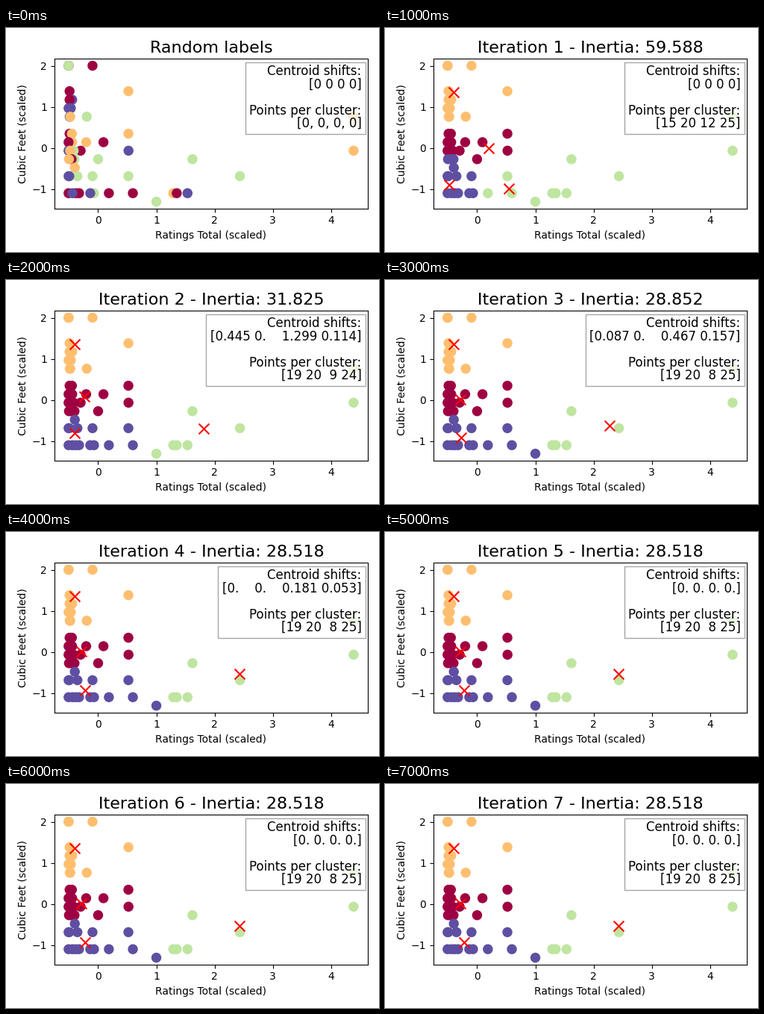
Animation, 500 px wide and 300 px high, one loop 8000 ms. Source, as a matplotlib script:

```python
import numpy as np
import matplotlib.pyplot as plt
from matplotlib.animation import FuncAnimation
from matplotlib.path import Path

plt.rcParams["font.family"] = "DejaVu Sans"

TOP, STEP = 2.0, 0.2066

# (level below the top, x positions, random start labels) in drawing order
ROWS = [
    (0, [-.507, -.507, -.096], "020"),
    (3, [-.49, .52], "01"),
    (4, [-.445, -.49], "30"),
    (5, [-.507, -.468], "33"),
    (6, [-.487, -.478, -.195, 4.386], "3121"),
    (8, [-.49, -.45, .52], "011"),
    (9, [-.445, -.507, -.205, .092], "1010"),
    (10, [-.30, -.507, -.42, -.48, .522, 4.386], "032131"),
    (11, [-.405, -.455, -.50, 0, 1.62], "20122"),
    (12, [-.40], "1"),
    (13, [-.355, -.507, -.495, -.096, .52, 2.435], "233222"),
    (15, [-.507, -.327, -.385, -.44, -.07, -.135,
          .185, .597, 1.29, 1.35, 1.535], "00032300103"),
    (16, [1.0], "2"),
]
pts = np.array([(x, TOP - STEP * k) for k, xs, _ in ROWS for x in xs])
start = np.array([int(c) for *_, labels in ROWS for c in labels])

UPPER = (-.40, 1.36)
CENTROIDS = [
    [(.205, -.005), UPPER, (.55, -.985), (-.475, -.895)],
    [(-.24, .085), UPPER, (1.815, -.70), (-.40, -.805)],
    [(-.288, .008), UPPER, (2.272, -.62), (-.28, -.92)],
    [(-.288, .008), UPPER, (2.427, -.535), (-.23, -.935)],
]
INERTIA = [59.588, 31.825, 28.852, 28.518]
SHIFTS = ["[0 0 0 0]", "[0 0 0 0]", "[0.445 0.    1.299 0.114]",
          "[0.087 0.    0.467 0.157]", "[0.    0.    0.181 0.053]",
          "[0. 0. 0. 0.]"]
COUNTS = ["[0, 0, 0, 0]", "[15 20 12 25]", "[19 20  9 24]", "[19 20  8 25]"]


def at(seq, i):
    """Item i, holding the last one once the run has converged."""
    return seq[min(i, len(seq) - 1)]


def nearest(centers):
    gaps = pts[:, None, :] - np.array(centers)[None, :, :]
    return (gaps ** 2).sum(axis=2).argmin(axis=1)


def snug_box(x, y, w, h, size, side=5.6, above=3.6, below=4.6):
    """Box around the text with tighter padding above and below."""
    left, right = x - side, x + w + side
    low, high = y - below, y + h + above
    return Path([(left, low), (right, low), (right, high), (left, high),
                 (left, low)], closed=True)


fig, ax = plt.subplots(figsize=(5, 3), dpi=100)
dots = ax.scatter(pts[:, 0], pts[:, 1], c=start, s=75,
                  cmap="Spectral", vmin=0, vmax=3)
marks = ax.scatter([0], [0], c="red", marker="x", s=100)
title = ax.set_title("Random labels", fontsize=16)
info = ax.text(0.98, 0.96, "", transform=ax.transAxes, fontsize=12,
               ha="right", va="top", linespacing=0.957,
               bbox=dict(boxstyle=snug_box, facecolor="white",
                         edgecolor="gray", alpha=0.7))
ax.set_xlabel("Ratings Total (scaled)")
ax.set_ylabel("Cubic Feet (scaled)")
ax.set_xticks(range(5))
ax.set_yticks(range(-1, 3))
pad_x, pad_y = 0.05 * np.ptp(pts, axis=0)
ax.set_xlim(pts[:, 0].min() - pad_x, pts[:, 0].max() + pad_x)
ax.set_ylim(pts[:, 1].min() - pad_y, pts[:, 1].max() + pad_y)
fig.tight_layout()
fig.subplots_adjust(top=1 - 41.4 / 300)


def draw(i):
    if i == 0:
        title.set_text("Random labels")
        dots.set_array(start)
    else:
        centers = at(CENTROIDS, i - 1)
        title.set_text(f"Iteration {i} - Inertia: {at(INERTIA, i - 1):.3f}")
        dots.set_array(nearest(centers))
        marks.set_offsets(centers)
    marks.set_visible(i > 0)
    info.set_text(f"Centroid shifts:\n{at(SHIFTS, i)}\n\n"
                  f"Points per cluster:\n{at(COUNTS, i)}")
    return dots, marks, title, info


anim = FuncAnimation(fig, draw, frames=8, interval=1000, repeat=True,
                     repeat_delay=0, blit=False)
plt.show()
```
